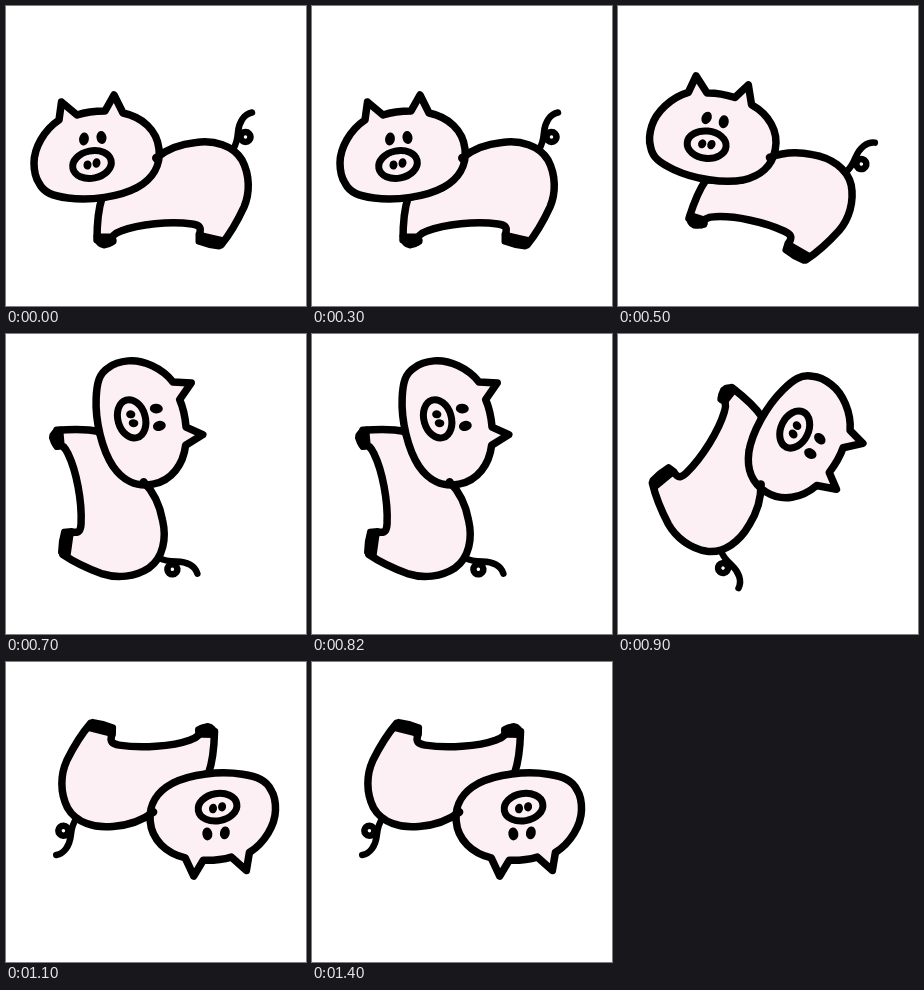
An HTML page with a canvas for the animation above (1600 ms loop, 300x300 px).

```html
<!DOCTYPE html>
<html lang="en">
<head>
<meta charset="utf-8">
<title>Tumbling pig</title>
<style>
  html, body { margin: 0; width: 100%; height: 100%; overflow: hidden; background: #fff; }
  canvas { display: block; width: 300px; height: 300px; }
</style>
</head>
<body>
<canvas id="stage"></canvas>
<script>
const LOOP = 1600;
const INK = '#000';
const SKIN = '#fcf0f5';
const CENTRE = { x: 142.2, y: 151.8 };

// Each pose holds until the next one: where the centre sits and how far it has turned.
const POSES = [
  { at: 0, x: 142.2, y: 151.8, turn: 0 },
  { at: 500, x: 144.3, y: 149, turn: 17.3 },
  { at: 700, x: 137.2, y: 140.2, turn: 85 },
  { at: 900, x: 147.8, y: 144.2, turn: 127.5 },
  { at: 1100, x: 155.2, y: 150.4, turn: 181.5 }
];

const body = new Path2D(
  'M96 192 C92 204 91 218 91 234 L105 236 C105 231 109 227 115 225 ' +
  'C133 218 164 215 186 218 C193 219 195 221 194 226 L195 235 L215 239 ' +
  'C224 228 232 214 238 201 C244 187 244 169 236 154 ' +
  'C227 139 208 134 190 136.5 C174 138 161 143 150 152 L130 182 Z');

const head = new Path2D(
  'M53 114 L55.5 96 L71 109 C80 106 89 105 99 105 L108 89 L117 107 ' +
  'C136 111 151 124 153 143 C155 160 146 173 132 181 ' +
  'C114 191 84 195 62 192 C47 190 38 187 33 177 ' +
  'C29 171 28 164 28 157 C28 142 38 124 53 114 Z');

const feet = new Path2D(
  'M90 230 L104 230 Q109 232 108 236 Q104 239 98 240 Q91 239 90 230 Z ' +
  'M192 228 L218 234 L213 241 Q202 240 192 236 Z');

const tail = new Path2D('M227 143 C231 138 231.5 132 232 126 C233 116 238 108 246 106.5');

const canvas = document.getElementById('stage');
const ctx = canvas.getContext('2d');
const scale = window.devicePixelRatio || 1;
canvas.width = canvas.height = 300 * scale;

function line(path, width, fill) {
  if (fill) {
    ctx.fillStyle = fill;
    ctx.fill(path);
  }
  ctx.lineWidth = width;
  ctx.stroke(path);
}

function oval(x, y, rx, ry, tilt = 0) {
  const path = new Path2D();
  path.ellipse(x, y, rx, ry, tilt, 0, Math.PI * 2);
  return path;
}

function dot(x, y, rx, ry, tilt) {
  ctx.fillStyle = INK;
  ctx.fill(oval(x, y, rx, ry, tilt));
}

function drawPig() {
  ctx.strokeStyle = INK;
  ctx.lineCap = ctx.lineJoin = 'round';
  line(tail, 6.5);
  line(oval(239.5, 131, 5, 5), 6.5);
  line(body, 7.5, SKIN);
  line(feet, 5, INK);
  line(head, 7.5, SKIN);
  dot(151, 152, 5, 4.5);
  line(oval(86, 158.5, 19.5, 13.7, -0.2), 7, SKIN);
  dot(81.5, 159, 4, 4.6, 0.15);
  dot(90.5, 157, 4, 4.8, 0.15);
  dot(78, 133, 4.9, 6.5, 0.15);
  dot(95.5, 131.5, 5, 6.5, -0.15);
}

function render(now) {
  const t = now % LOOP;
  const pose = POSES.filter(p => p.at <= t).pop();
  ctx.setTransform(scale, 0, 0, scale, 0, 0);
  ctx.fillStyle = '#fff';
  ctx.fillRect(0, 0, 300, 300);
  ctx.translate(pose.x, pose.y);
  ctx.rotate(pose.turn * Math.PI / 180);
  ctx.translate(-CENTRE.x, -CENTRE.y);
  drawPig();
}

let start;
function tick(now) {
  if (start === undefined) start = now;
  render(now - start);
  requestAnimationFrame(tick);
}
render(0);
requestAnimationFrame(tick);
</script>
</body>
</html>
```
